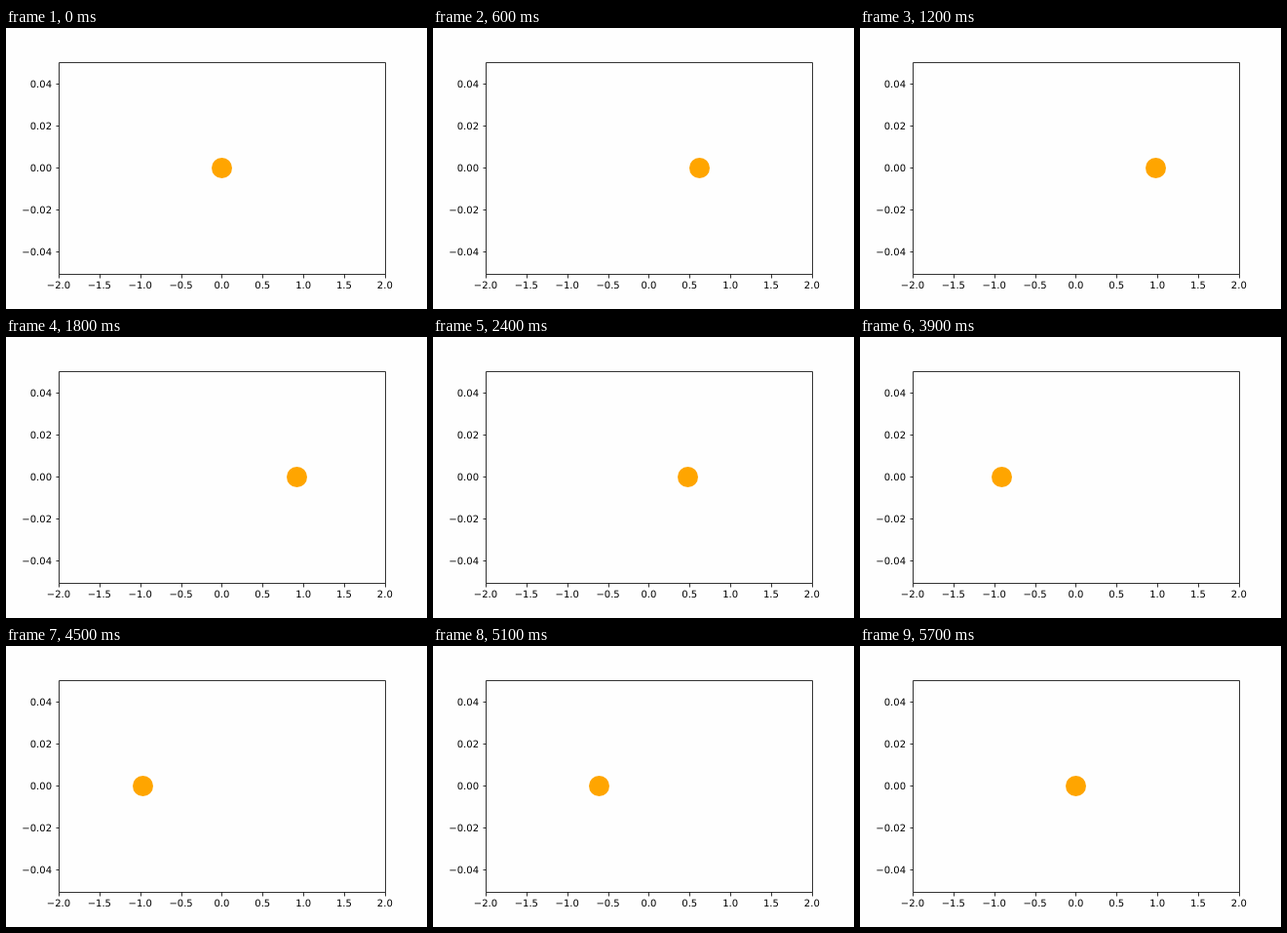
Animation of 432x288 px, one loop 6 s. Source, as an HTML page:

```html
<!DOCTYPE html>
<html lang="en">
<head>
<meta charset="utf-8">
<title>Oscillating dot</title>
<style>
  html, body { margin: 0; width: 100%; height: 100%; overflow: hidden; background: #fefefe; }
  svg { display: block; }
  text { font: 10px "DejaVu Sans", sans-serif; text-rendering: geometricPrecision; }
  path { fill: none; stroke: #000; stroke-width: 0.8; }
</style>
</head>
<body>
<svg width="432" height="288" viewBox="0 0 432 288">
  <circle id="dot" cy="143.5" r="10.5" fill="#ffa500"/>
  <g id="axes"><path d="M54.5 35.5H389.5V252.5H54.5Z"/></g>
</svg>
<script>
const STEPS = 20, STEP_MS = 300;
const axes = document.getElementById("axes");
const dot = document.getElementById("dot");

// Data to pixels, snapped to pixel centres
const snap = v => Math.floor(v + 0.5) + 0.5;
const mapX = x => 221.4 + 83.7 * x;
const mapY = y => 143.28 - 2153 * y;

function add(name, attrs, text = "") {
  const node = document.createElementNS("http://www.w3.org/2000/svg", name);
  for (const key in attrs) node.setAttribute(key, attrs[key]);
  node.textContent = text;
  axes.append(node);
}

const label = (value, digits) => value.toFixed(digits).replace("-", "\u2212");

for (let i = -4; i <= 4; i++) {
  const x = mapX(i / 2);
  add("path", { d: `M${snap(x)} 252.5v4` });
  add("text", { x, y: 267, "text-anchor": "middle" }, label(i / 2, 1));
}
for (let i = -2; i <= 2; i++) {
  const y = snap(mapY(i / 50));
  add("path", { d: `M54.5 ${y}h-3` });
  add("text", { x: 47, y: y + 3.5, "text-anchor": "end" }, label(i / 50, 2));
}

// One full sine period, sampled with both end points included
function draw() {
  const step = Math.floor(performance.now() / STEP_MS) % STEPS;
  const angle = 2 * Math.PI * step / (STEPS - 1);
  dot.setAttribute("cx", snap(mapX(Math.sin(angle))));
  requestAnimationFrame(draw);
}
draw();
</script>
</body>
</html>
```
